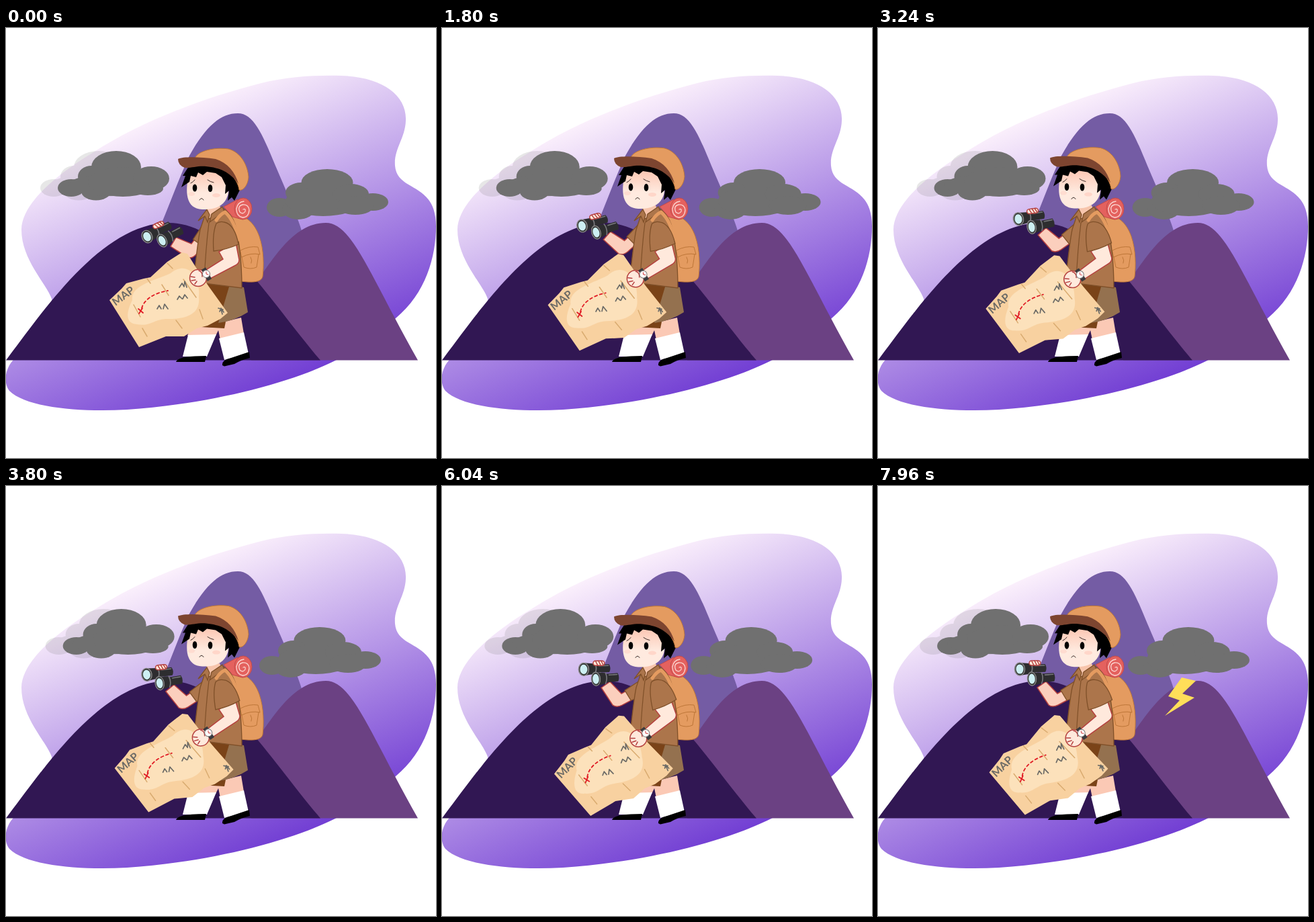
Write an HTML page that moves like this. It is 640x640 px and loops after 8 s.

```html
<!DOCTYPE html>
<html lang="en">
<head>
<meta charset="utf-8">
<title>Hiker with a map</title>
<style>
  html, body { margin: 0; width: 100%; height: 100%; overflow: hidden; background: #fff; }
  svg { display: block; width: 100vw; height: 100vh; }
  .shirt { fill: #ac754b; stroke: #7f5029; stroke-width: 1.3; }
  .skin { fill: #ffe9dc; }
  .red { stroke: #b5413f; stroke-width: 1.5; }
  .line { fill: none; stroke-linecap: round; stroke-linejoin: round; }
  .pack { fill: #e49b60; stroke: #bd7638; stroke-width: 1; }
  .cloud { fill: #707070; }
</style>
</head>
<body>
<svg viewBox="0 0 640 640">
  <defs>
    <linearGradient id="sky" gradientUnits="userSpaceOnUse" x1="240" y1="90" x2="450" y2="590">
      <stop offset=".04" stop-color="#fff5fd"/>
      <stop offset="1" stop-color="#5c22cd"/>
    </linearGradient>
    <linearGradient id="face" x2="0" y2="1">
      <stop offset=".1" stop-color="#fcc9b6"/>
      <stop offset=".6" stop-color="#ffeadf"/>
    </linearGradient>
    <g id="puffs">
      <ellipse cx="164" cy="207" rx="37" ry="24"/>
      <ellipse cx="127" cy="221" rx="20" ry="16"/>
      <ellipse cx="97" cy="238" rx="20" ry="13"/>
      <ellipse cx="134" cy="243" rx="22" ry="13.500"/>
      <ellipse cx="150" cy="234" rx="58" ry="16"/>
      <ellipse cx="174" cy="229" rx="52" ry="22"/>
      <ellipse cx="216" cy="224" rx="27" ry="18"/>
      <ellipse cx="211" cy="239" rx="23" ry="10"/>
    </g>
    <g id="tube">
      <path d="M0-10L15-8V-6.500H33Q36 0 33 6H15L14 8 0 10Z" fill="#2d2d2f"/>
      <path d="M15-8Q18 0 14 8M20-4.500H32" class="line" stroke="#77777b" stroke-width="1.6"/>
      <ellipse rx="6.500" ry="10" fill="#333" stroke="#858585" stroke-width="1.4"/>
      <ellipse rx="4.800" ry="7.500" fill="#cdeff2"/>
    </g>
  </defs>

  <path fill="url(#sky)" d="M23 300C23 260 80 215 130 185C200 140 290 105 380 82C420 72 460 70 500 71C560 73 597 100 595 138C594 165 577 180 579 205C582 245 640 228 640 295C640 340 625 395 580 432C550 460 525 478 490 495C420 530 300 560 180 568C110 572 30 565 5 540C-3 530-3 510 10 495C40 460 70 430 68 403C60 380 23 345 23 300Z"/>
  <path fill="#745ca4" d="M200 360C235 290 250 240 273 190C298 145 320 127 345 127C368 127 381 156 401 205C421 252 432 275 441 305L445 400H200Z"/>
  <path fill="#6b4183" d="M365 494.500V388C395 350 425 290 476 290C515 290 540 365 613 494.500Z"/>
  <path fill="#311753" d="M0 494.500C54 424 142 290 242 290C325 290 384 395 468 494.500Z"/>

  <g id="leftCloud" class="cloud">
    <use href="#puffs" x="-26" opacity=".16"/>
    <use href="#puffs"/>
  </g>
  <path id="bolt" fill="#ffde59" d="M452 285L473 290 453 309 471 315 427 342 449 319 432 313Z"/>
  <g id="rightCloud" class="cloud">
    <ellipse cx="478" cy="230" rx="38.5" ry="20"/>
    <ellipse cx="439" cy="245" rx="23" ry="15"/>
    <ellipse cx="407" cy="267" rx="19" ry="14"/>
    <ellipse cx="435" cy="270" rx="24" ry="15"/>
    <ellipse cx="472" cy="258" rx="56" ry="22"/>
    <ellipse cx="513" cy="247" rx="27" ry="15"/>
    <ellipse cx="546" cy="259" rx="23" ry="13"/>
    <ellipse cx="520" cy="264" rx="28" ry="14"/>
  </g>

  <!-- backpack and bedroll -->
  <path class="pack" d="M335 280C355 275 370 290 377 310C384 330 384 355 382 370C380 379 365 379 350 377L340 300Z"/>
  <path class="pack line" stroke-width="1.4" d="M349 331Q362 324 375 326L378 337Q364 334 351 341ZM351 341L354 356Q364 360 373 356L376 337M364 341Q367 346 365 350"/>
  <path fill="#e4615e" stroke="#c24a4a" d="M324 266L345 255 352 285 337 281Z"/>
  <ellipse cx="353" cy="269" rx="13" ry="16" fill="#e4615e" stroke="#c24a4a"/>
  <path class="line" stroke="#fbd5d0" stroke-width="1.3" d="M353 270q4-2 3 3q-3 5-8 1q-4-9 4-11q9-1 10 8q-1 11-10 11q-9-2-9-13q2-10 11-11"/>

  <!-- far arm with binoculars -->
  <g id="farArm">
    <path class="red" fill="#fbcfbd" d="M237 300L250 291 267 309 276 304 285 317 268 326Q260 330 254 326Z"/>
    <path class="shirt" d="M297 288L272 304 281 319 302 312Z"/>
    <use href="#tube" transform="translate(211 272.5) rotate(-2) scale(1.15 .95)"/>
    <g class="skin red">
      <rect x="225" y="260" width="17" height="7" rx="3.5"/>
      <path class="line" d="M229 261l3 6M233 260l3 6M237 260l3 6"/>
    </g>
    <use href="#tube" transform="translate(229 287) rotate(-4)"/>
  </g>

  <!-- legs -->
  <path fill="#fbc9b5" d="M276 444L318 446 312 458H270ZM314 440L350 431 354 455 319 464Z"/>
  <path fill="#fff" d="M271 457L313 456 299 489H263ZM317 462L354 453 361 485 325 494Z"/>
  <path d="M253 497Q255 488 298 488L296 497ZM322 502Q321 494 335 491L362 482 363 491Q350 494 340 500L325 503.500Z"/>
  <path fill="#7a4318" d="M300 378L338 383 325 447 290 445Z"/>
  <path fill="#94714f" d="M333 382L354 386 360 423Q340 436 316 439Z"/>

  <!-- torso -->
  <path fill="#f7c5ac" d="M298 266L318 264 322 275 303 288Z"/>
  <path class="shirt" d="M296 279L303 284 321 267C330 272 338 282 341 292C348 320 351 350 351 387L279 378C282 350 285 320 289 300Z"/>
  <path class="shirt" d="M286 287L299 270 303 278 300 289 296 280ZM303 289L306 277 322 266 325 273Z"/>
  <path class="line" stroke="#7f5029" stroke-width="1.2" d="M302 290Q297 330 295 378"/>
  <path class="line" stroke="#e49b60" stroke-width="5" d="M313 286Q319 277 326 274Q340 286 346 315"/>

  <!-- head -->
  <g id="head">
    <path fill="url(#face)" d="M271 224C267 245 268 269 292 270C315 271 328 262 331 245L328 212 285 209Z"/>
    <ellipse cx="276" cy="247" rx="5" ry="3" fill="#ffdcd0"/>
    <ellipse cx="313" cy="249" rx="6" ry="3" fill="#ffd6c9"/>
    <ellipse cx="281" cy="238" rx="3.3" ry="5.6"/>
    <ellipse cx="304" cy="238.500" rx="3.3" ry="5.6"/>
    <path class="line" stroke="#3c2b28" d="M275 231Q279 229 281 226M300 226Q304 229 309 230M288 256q3-5 6 0"/>
    <path d="M272 206L263 220 267 220 261 237 273 229 275 220 283 222 286 215 293 219 299 214 312 216 321 222 327 234 326 247 332 242 330 257 336 252 340 257 348 241 345 228 330 210 300 203Z"/>
    <path class="pack" d="M281 194C285 183 310 177 331 180C350 185 360 205 361 222C360 235 352 243 347 241C345 225 330 208 300 198Z"/>
    <path fill="#7d4530" d="M256 195C265 191 290 192 312 195C330 201 341 214 346 232C333 214 318 208 298 206C284 205 275 209 266 208Q256 204 256 195Z"/>
  </g>

  <!-- near arm with map -->
  <g id="nearArm">
    <path fill="#f8d1a0" d="M154 405L172 388 179 380 205 373 215 371 240 348 262 334 270 336 285 360 302 385 330 424 319 433 300 443 284 447 265 459H238L198 475Z"/>
    <path fill="#fce1bb" d="M188 405C185 382 225 375 245 365C270 345 290 370 287 400C290 430 262 433 240 433C220 433 215 445 195 441C178 440 178 425 188 405Z"/>
    <path class="line" stroke="#d9ab70" stroke-width="1.5" d="M210 373l5 7M240 350l8 8M190 412l10 18M203 447l7 12M232 382l10 16M253 435l9 12M264 374l19 27M288 419l5 14"/>
    <text transform="translate(163 414) rotate(-36)" font-family="Lato, 'Open Sans', sans-serif" font-size="16" font-weight="700" fill="#6b6a66">MAP</text>
    <path class="line" stroke="#e01b24" stroke-width="1.8" stroke-dasharray="4 4" d="M202 417C206 403 222 394 241 391"/>
    <path class="line" stroke="#e01b24" stroke-width="1.8" d="M197 418l7 6M203 417l-5 8"/>
    <path class="line" stroke="#6b6a66" stroke-width="1.7" d="M225 418l3-5 3 5M234 418l2-7 5 7M255 404l3-5 4 4M263 403l3-6 4 5M258 386l4-6 3 5 1-8 3 9M316 417l7 2M318 422l2-5 4 6M320 418l2 8"/>
    <path class="skin red" d="M317 333L342 319 347 345Q347 351 340 354L302 374 296 361 323 344Z"/>
    <circle class="skin red" cx="286" cy="372" r="12.500"/>
    <path class="line red" d="M275 370l6 1M276 376l6-1M281 381l3-4M287 361q6 2 5 9"/>
    <path class="line" stroke="#39393d" stroke-width="7" style="stroke-linecap:butt" d="M294 358L303 375"/>
    <circle cx="298" cy="366" r="5.500" fill="#fff" stroke="#777"/>
    <path class="line" stroke="#c33" d="M298 363v3l3 1"/>
  </g>
  <path id="sleeve" class="shirt" d="M313 291C308 303 308 318 309 332Q328 330 346 322C343 305 336 291 325 289Q318 287 313 291Z"/>
</svg>
<script>
  const LOOP = 8000, STEP = 112, TURN = 6650, BOLT_AT = 7000;
  const part = id => document.getElementById(id);
  const move = (id, x, y = 0) => part(id).setAttribute('transform', `translate(${x} ${y})`);
  const turn = (id, angle, x, y) => part(id).setAttribute('transform', `rotate(${angle} ${x} ${y})`);

  function draw(now) {
    const t = Math.floor(now % LOOP / STEP) * STEP;
    const sway = TURN - Math.abs(TURN - t);   // rises, then falls back
    const lift = Math.sin(Math.PI / 2 * Math.min(1, t / 6500));

    move('leftCloud', sway * .00207);
    move('rightCloud', sway * -.003);
    turn('farArm', 24 * lift - 24, 300, 294);
    turn('nearArm', sway * -.00149, 313, 333);
    turn('sleeve', sway * -.00149, 320, 302);
    move('head', 0, -1.5 * Math.sin(Math.PI * sway / TURN));
    part('bolt').setAttribute('visibility', t >= BOLT_AT ? 'visible' : 'hidden');
    requestAnimationFrame(() => draw(performance.now()));
  }
  draw(0);
</script>
</body>
</html>
```
